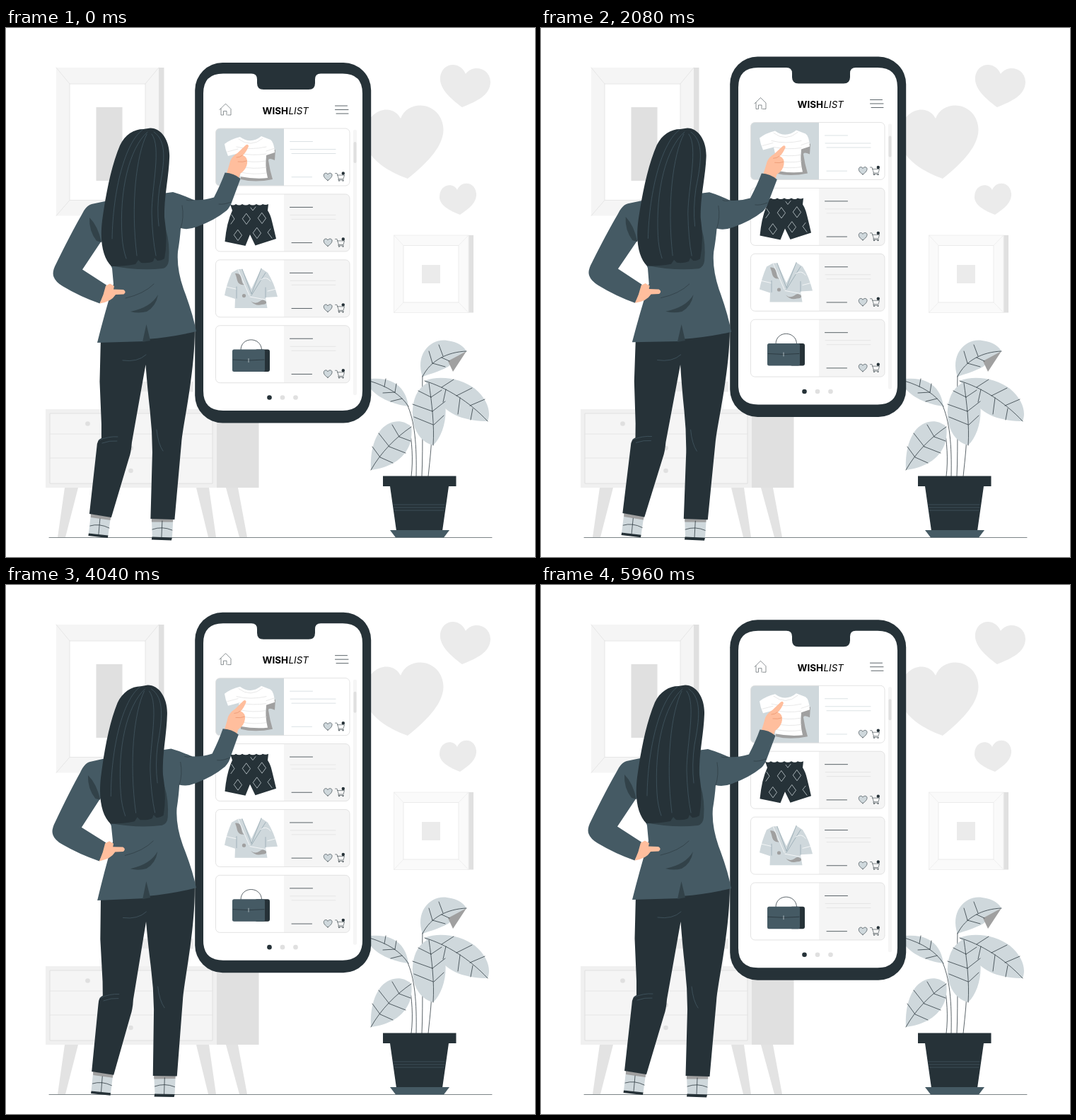
An HTML page for the animation above (6000 ms loop, 748 px wide and 748 px high).

```html
<!DOCTYPE html>
<html lang="en">
<head>
<meta charset="utf-8">
<title>Wishlist</title>
<style>
html, body { margin: 0; width: 100%; height: 100%; overflow: hidden; background: #fff; }
svg { display: block; width: 100vw; height: 100vh; }
text { font: 13.4px Inter, "Open Sans", sans-serif; fill: #000; }
.dark { fill: #263238; }
.slate { fill: #455a64; }
.shade { fill: #324249; }
.pale { fill: #cfd8dc; }
.skin { fill: #ffbe9d; }
.grey { fill: #e0e0e0; }
.mist { fill: #ebebeb; }
.fog { fill: #f5f5f5; }
.white { fill: #fff; }
.mid { fill: #a0a0a0; }
.line { fill: none; stroke: #263238; stroke-width: .75; stroke-linecap: round; stroke-linejoin: round; }
.line.soft { stroke: #90a4ae; }
.line.strand { stroke: #455a64; }
.line.faint { stroke: #e0e0e0; }
</style>
</head>
<body>
<svg viewBox="0 0 748 748">
  <g id="room">
    <!-- large picture -->
    <path class="grey" d="M216 56h7.500v209.500H216z"/>
    <path class="fog" d="M71 56h145v209.500H71z"/>
    <path class="white" stroke="#e6e6e6" d="M90 79h107v164.500H90z"/>
    <path class="line faint" d="M71 56l19 23M216 56l-19 23M71 265.500l19-22M216 265.500l-19-22"/>
    <path class="grey" d="M127.500 112h37v104h-37z"/>
    <!-- small picture -->
    <path class="grey" d="M654 293h7v109.500h-7z"/>
    <path fill="#fafafa" stroke="#f0f0f0" d="M548.500 293H654v109.500H548.500z"/>
    <path class="white" stroke="#ebebeb" d="M562 307.500h78v80.500h-78z"/>
    <path class="line" style="stroke:#ebebeb" d="M548.500 293l13.500 14.500M654 293l-14 14.500M548.500 402.500L562 388M654 402.500L640 388"/>
    <path class="mist" d="M588 335h26v26h-26z"/>
    <!-- hearts -->
    <g class="mist">
      <path d="M568 213C540 203 503 182 507 148C510 117 545 104 558 128C566 106 597 103 612 123C629 149 612 178 568 213Z"/>
      <path d="M645 112C630 101 612 86 614 69C617 48 642 46 650 65C660 51 684 56 685 76C685 95 665 104 645 112Z"/>
      <path d="M642 264C629 259 612 251 613 238C614 220 633 218 638 229C643 216 663 216 665 234C666 248 652 257 642 264Z"/>
    </g>
    <!-- cabinet -->
    <path class="mist" d="M176 500h89v14.500h-89z"/>
    <path class="fog" d="M182 514.500h76V539h-76z"/>
    <path class="grey" d="M298 539h59.500v111H298z"/>
    <path fill="#e3e3e3" d="M83 650h19l-18 70H73zM269 650h18l10 70h-11zM311 650h17l13 70h-11z"/>
    <path fill="#f0f0f0" d="M56 539h242v111H56z"/>
    <path class="fog" stroke="#e0e0e0" d="M62 545h230v99H62z"/>
    <path class="line faint" d="M62 574h230M62 608h230M177 545v29"/>
    <g class="grey"><circle cx="115.500" cy="559.500" r="3.300"/><circle cx="238" cy="559.500" r="3.300"/><circle cx="176.500" cy="594" r="3.300"/><circle cx="176.500" cy="626" r="3.300"/></g>
    <path class="line" d="M61 720.500h626" stroke-opacity=".8"/>
    <!-- plant -->
    <path class="line" d="M580 634C581 590 578 555 567 532M588 634C590 590 588 530 589 490M597 634C600 605 602 590 602 565M573 634C576 610 574 585 570 562"/>
    <g class="pale">
      <path d="M589 493C578 462 600 438 624 442C640 444 648 451 651 457C641 462 636 470 625 479C612 486 600 489 589 493Z"/>
      <path d="M569 535C565 506 545 491 508 497C514 516 538 531 569 535Z"/>
      <path d="M592 499C613 490 645 496 663 510C682 526 686 544 681 556C655 556 620 549 611 522Z"/>
      <path d="M573 564C560 552 543 555 531 567C517 584 515 608 516 625C540 622 563 611 571 588C574 578 574 570 573 564Z"/>
      <path d="M596 502C575 512 571 543 578 565C584 581 595 588 604 590C620 575 627 540 617 516C612 507 606 503 596 502Z"/>
    </g>
    <path class="mid" d="M625 471L651 457L632 486Z"/>
    <path class="line" d="M589 493C600 470 624 458 651 457M603 474l-5-17M618 464l-6-16M603 474l18 5M616 466l11 5
      M569 535C558 518 540 507 514 499M550 515l2-12M535 507l2-11M550 515l-17 1M560 524l-16 4
      M592 499C622 508 655 528 681 556M616 508l17-11M637 520l22-11M656 534l21-9M622 511l-4 18M642 523l-3 23M660 538l-3 16
      M573 564C551 579 530 600 516 625M556 578l-10-17M542 592l-15-19M529 607l-11-15M556 578l16 6M542 592l23 9M529 607l18 8
      M598 502C602 530 606 562 604 590M601 522l-18-9M603 542l-28-10M604 561l-27-11M601 522l15-10M603 542l18-14M605 561l14-13"/>
    <path class="dark" d="M533 633.500h103.500V648H626l-9 63h-65l-9-63h-10z"/>
    <path class="line strand" d="M548 674h72M548 678h72M549 682h70"/>
    <path class="slate" d="M543 710h84l-8 10.500h-68z"/>
  </g>

  <g id="phone">
    <rect class="dark" x="267.200" y="49" width="249" height="509.500" rx="39"/>
    <path class="white" d="M307 64.500H347q8 0 8 8v5.500q0 9 9 9h64q9 0 9-9v-5.500q0-8 8-8H476q28 0 28 28V513q0 28-28 28H307q-28 0-28-28V92.500q0-28 28-28z"/>
    <path class="line" d="M302 115.500l8.500-8.500l7.500 7.500v8.500h-4.500M304 114v9h3.500v-5.500h4.500v5.500" stroke-opacity=".7"/>
    <path class="line" d="M465.500 110h17M465.500 115.500h18.500M467 121h17"/>
    <text x="362.500" y="121.800" style="font-weight:700">WISH</text>
    <text x="399.500" y="121.800" style="font-style:italic">LIST</text>
    <rect class="fog" x="491" y="144" width="5" height="375" rx="2"/>
    <rect class="grey" x="491.500" y="161" width="4" height="30" rx="2"/>
    <g id="cards"></g>
    <!-- T-shirt -->
    <path class="mid" d="M368 178L381 172L380 187Q371 183 371 187Q373 201 377 214Q352 219 332 214V206H366Z"/>
    <path class="white" d="M331 154Q346 165 361 153L374 158Q379 161 380 176L368 180Q366 196 370 212Q352 214 331 210Q334 195 329 177L314 181Q310 172 309 164Q318 157 331 154Z"/>
    <path class="line faint" d="M329 157Q346 170 363 156M326 168q20 5 42 0M329 177q20 4 39 1M331 187q18 4 36 1M332 196q18 4 36 1M332 204q18 4 36 1M313 175l15-4M368 174l12-4"/>
    <!-- shorts -->
    <path class="dark" d="M317 249q4 3 8 0q5 3 9 0q5 3 10 0q5 3 10 0q5 3 9 0q4 2 8 0l-1 9q4 6 6 15q3 12 6 25L352.500 307.500L345 292L338.500 308L309.500 302Q312 275 320 258z"/>
    <path class="line" style="stroke:#cfd8dc" id="diamonds"/>
    <!-- wrap jacket -->
    <path class="pale" d="M328 341L319 346Q312 362 309 378L324 383L323.500 396H369.500L367 381L384 380Q379 360 370 346L361 340L347 369L334 341Z"/>
    <path class="mid" d="M324 347q8-1 9 8q1 7 4 8q-8 1-10-6q-1-5-3-10zM346 386q6 5 12 1q5-5 10 0q1 4-6 4q-9 3-16-5z"/>
    <circle class="mid" cx="336.500" cy="378.500" r="2.600"/>
    <path class="line soft" d="M334 341L347 376L361 340M367 346L347 378M326 366v16M367 367v14"/>
    <path class="line" style="stroke:#fff" d="M328 341L344 378M312 366l13 3M360 356q8-6 14 2M345 380l22 4M370 372l12-3"/>
    <!-- bag -->
    <path class="line" d="M332 455c0-19 29-19 29.500 0"/>
    <rect class="dark" x="352" y="454.500" width="21" height="31.500" rx="3"/>
    <rect class="slate" x="320" y="454.500" width="46" height="31.500" rx="2.500"/>
    <path class="line" d="M321 469q22 2 44 0"/>
    <path class="line" style="stroke:#cfd8dc" d="M343 467.500v5"/>
    <circle class="dark" cx="372.500" cy="522.500" r="3.300"/>
    <g class="grey"><circle cx="391" cy="522.500" r="3.300"/><circle cx="409.500" cy="522.500" r="3.300"/></g>
  </g>

  <g id="woman">
    <!-- boots -->
    <path class="pale" d="M120 688L148 692L144.500 718L117 714.500ZM206 694H236.500L235 720.500H207Z"/>
    <path class="mid" d="M120 687L148.500 691L147.500 696L120 692ZM206 694h30.500l-.5 4.500H206z"/>
    <path class="dark" d="M117 714.500L144.500 717.500L144 721L116.500 718ZM206.500 719.500L235 720.500L234 724.500L206 723.500Z"/>
    <path class="line" d="M119 704q13-4 27 3M133 694l-2 22M207 709q14-5 28 1M221 697l-1 23"/>
    <!-- trousers -->
    <path class="dark" d="M134 438L132.500 500L135 560V580Q129 582 128.500 592L118 687L149 692L174 608Q177 600 178 586L197.500 476Q200 510 203.500 540Q207 570 207 600L204.500 694L238.500 695L248 588C250 560 267 490 267 425Z"/>
    <path class="line strand" d="M165 470Q186 473 198 462M131 583Q145 577 158 578M136 587Q147 583 157 584M213 568Q215 588 222 598"/>
    <!-- pointing hand -->
    <path class="skin" d="M311 208Q315 196 317 188Q320 181 327 177L338.500 166Q342 163 343 167Q340 175 335 180Q342 183 341 191Q340 200 331 206L328 217Z"/>
    <path class="line" style="stroke:#e8946f" d="M326 183q5 0 8-3M328 189q7 1 12-1"/>
    <!-- jacket -->
    <path class="slate" d="M140 245L121 249Q113 251 107 264Q92 290 71 333Q64.500 345 67.500 352Q70 359 80 365Q105 380 132.500 389.500Q139 378 142 363.500L108 341.500L135 301Q144 325 150 340L152 362Q139 405 129 445L197 443L199 440Q236 437 269 429Q264 403 251 369Q241 340 243 316Q246 298 247 283Q257 286 270 281Q295 272 312 258Q318 252 320 244L331.500 213Q322 205 309.500 204.500Q304 220 294 239.500Q280 244 265 243Q250 236 236 232Z"/>
    <path class="shade" d="M118 268Q117 287 128 301L135 303Q130 280 118 268ZM176 401Q205 395 215 377Q212 394 199 401Q188 404 176 401ZM198.500 419L193 444L204 442Z"/>
    <path class="shade" d="M148 336Q188 344 222 340Q229 338 230 329Q232 305 226 285Z"/>
    <path class="line" d="M249 251Q252 268 247 283M169 382Q195 376 209 362M265 243q-6 2-10 0M318 246q-10 4-17 3" stroke-opacity=".7"/>
    <!-- hand on hip -->
    <path class="skin" d="M141 364.500L147 361.500L153 365L152 369.500L166 370Q171 373 166.500 376.500L155 377Q149 387 132.500 389.500Q138 378 141 364.500Z"/>
    <!-- hair -->
    <path class="dark" d="M194 143C181 143 168 151 161 166C149 194 141 235 136 272C132 305 138 326 149 337Q168 337 183 334L187 328L191 332Q202 333 208 330L210 325L214 329Q220 329 224 326Q229 300 224 268C223 240 230 212 231 183C232 160 220 141.500 204 141.500Z"/>
    <path class="line strand" d="M193 144C168 162 151 230 150 298M200 147C174 170 160 230 164 294Q165 312 170 326M206 150C220 168 206 225 206 262Q207 298 212 322M199 150C184 180 176 250 185 322M209 147C228 160 224 190 217 226Q213 255 216 280"/>
  </g>
</svg>
<script>
const $ = id => document.getElementById(id);

const card = i => {
  const y = 142 + 92.9 * i, first = i === 0;
  const ink = first ? '#cfd8dc' : '#263238';
  return `<rect x="296.500" y="${y}" width="189.500" height="81" rx="6" fill="${first ? '#fff' : '#f5f5f5'}"/>
    <path d="M393 ${y}H302.500q-6 0-6 6v69q0 6 6 6H393z" fill="${first ? '#cfd8dc' : '#fff'}"/>
    <rect x="296.500" y="${y}" width="189.500" height="81" rx="6" fill="none" stroke="#e0e0e0" stroke-width=".9"/>
    <g transform="translate(0 ${y})">
      <path class="line" style="stroke:${ink}" d="M401.500 18.500h32M404 68.700h28.500"/>
      <path class="line" style="stroke:${first ? '#cfd8dc' : '#e0e0e0'}" d="M402 29.500h64M404 35.500h62"/>
      <path class="line" style="fill:#cfd8dc;stroke-width:.6" d="M455 73.500C451 71 448.500 68 449.500 65C450.500 62.500 454 62.500 455 65C456.500 62.500 460 62.500 461 65C461.500 68 459 71 455 73.500Z"/>
      <path class="line" style="stroke-width:.55" d="M465.500 63.500h2.500l2.500 8h6.500l1.500-5.500h-10M470 71.500v1.500h7.500"/>
      <circle class="dark" cx="471" cy="74" r=".8"/><circle class="dark" cx="476.500" cy="74" r=".8"/>
      <circle class="dark" cx="476.800" cy="63.500" r="2.200"/>
    </g>`;
};
$('cards').innerHTML = [0, 1, 2, 3].map(card).join('');

const diamond = ([x, y]) => `M${x} ${y - 7.5}l5.500 7.500l-5.500 7.500l-5.500-7.500z`;
$('diamonds').setAttribute('d', [[340, 270], [362, 269], [328, 293], [355, 290]].map(diamond).join('')
  + 'M319 264l4 6l-5 7M374 284l-4 5l6 8M346 254l3 4l4-5');

function draw(now) {
  const t = (now + 30) % 6000;
  const lift = 14.96 * (1 - Math.abs(1 - t % 3000 / 1500));
  const sway = Math.asin(Math.sin(t / 3000 * Math.PI)) * 2 / Math.PI;
  $('phone').setAttribute('transform', `translate(0 ${0.35 - lift})`);
  $('woman').setAttribute('transform', `rotate(${sway} 204 432.500)`);
}
function tick() {
  draw(performance.now());
  requestAnimationFrame(tick);
}
tick();
</script>
</body>
</html>
```
